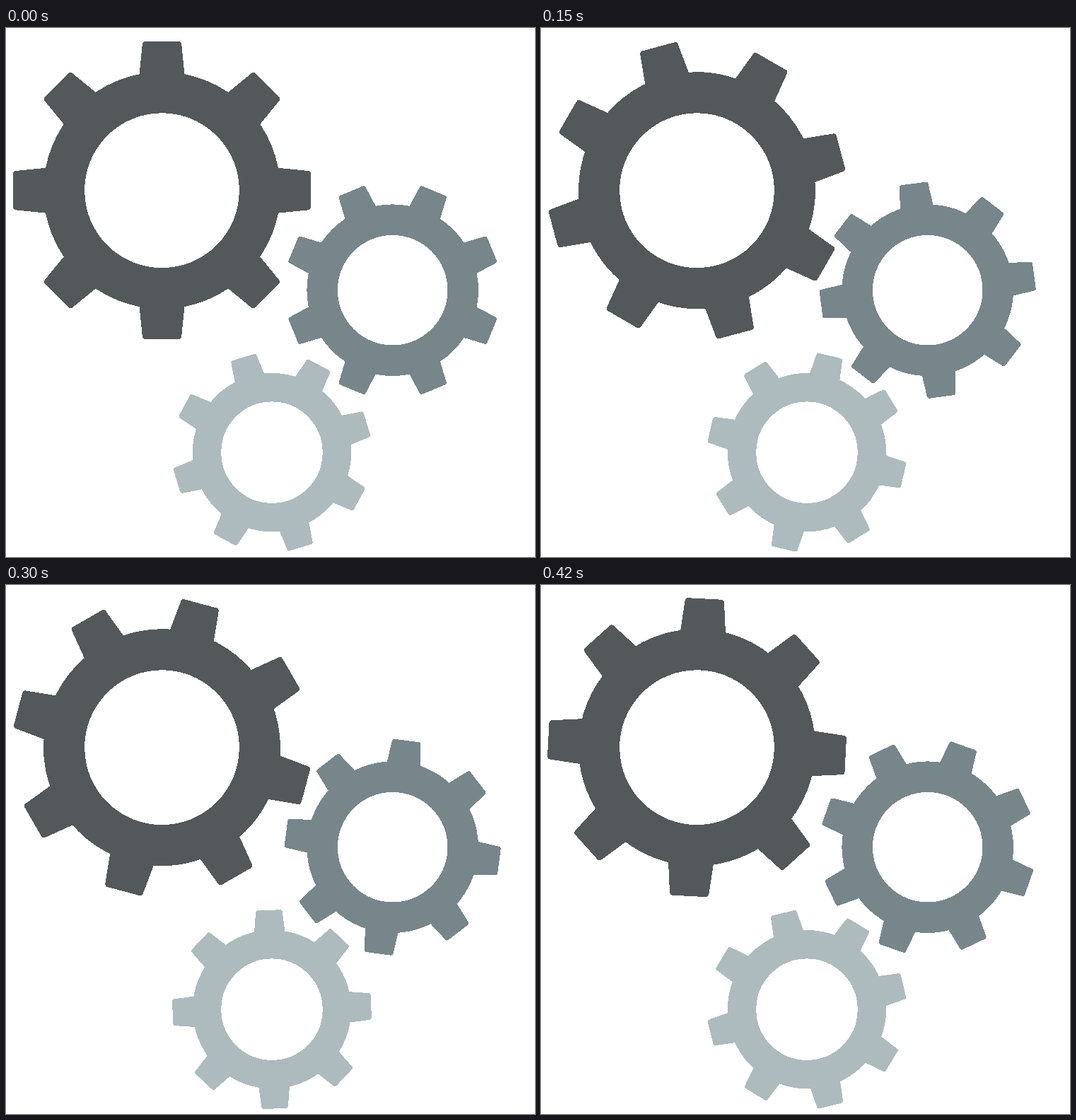
Write an HTML page that moves like this. It is 748 by 748 pixels and loops after 450 ms.

```html
<!DOCTYPE html>
<html lang="en">
<head>
<meta charset="utf-8">
<title>Gears</title>
<style>
  html, body { margin: 0; width: 100%; height: 100%; overflow: hidden; background: #fff; }
  svg { display: block; width: 100%; height: 100%; }
</style>
</head>
<body>
<svg viewBox="0 0 748 748" shape-rendering="crispEdges"></svg>
<script>
const LOOP = 450, STEP = 30, TEETH = 8, FLARE = 0.1;
const svg = document.querySelector('svg');

// tip: radius at tooth top, half: half tooth width there, spin: direction
const gears = [
  { x: 220.5, y: 229.7, tip: 210.5, rim: 167.5, hole: 109.4, half: 27.3, corner: 4, start: 0, spin: -1, color: '#53585a' },
  { x: 546.7, y: 370.7, tip: 152, rim: 121.3, hole: 77.8, half: 20.2, corner: 3, start: -22.5, spin: 1, color: '#77868a' },
  { x: 376, y: 600.1, tip: 140.4, rim: 112.2, hole: 71.7, half: 18.6, corner: 3, start: -16.7, spin: -1, color: '#adbbbe' }
];

function add(parent, name, attrs) {
  const node = document.createElementNS(svg.namespaceURI, name);
  for (const key in attrs) node.setAttribute(key, attrs[key]);
  return parent.appendChild(node);
}

function toothPath({ tip, rim, hole, half, corner }) {
  const root = (rim + hole) / 2;
  const base = half + (tip - root) * FLARE;
  const side = half + corner * FLARE;
  const flat = half - corner;
  return `M${-base},${-root} L${-side},${corner - tip} Q${-half},${-tip} ${-flat},${-tip}
    H${flat} Q${half},${-tip} ${side},${corner - tip} L${base},${-root}Z`;
}

for (const gear of gears) {
  const { x, y, rim, hole, color } = gear;
  const group = add(svg, 'g', { transform: `translate(${x} ${y})` });
  add(group, 'circle', { r: (rim + hole) / 2, fill: 'none', stroke: color, 'stroke-width': rim - hole });
  gear.wheel = add(group, 'g', { fill: color });
  const d = toothPath(gear);
  for (let i = 0; i < TEETH; i++) {
    add(gear.wheel, 'path', { d, transform: `rotate(${i * 360 / TEETH})` });
  }
}

// Each loop advances every gear by exactly one tooth.
function draw() {
  const time = Math.floor(performance.now() % LOOP / STEP) * STEP;
  const turn = time / LOOP * 360 / TEETH;
  for (const { wheel, start, spin } of gears) {
    wheel.setAttribute('transform', `rotate(${start + spin * turn})`);
  }
  requestAnimationFrame(draw);
}
draw();
</script>
</body>
</html>
```
